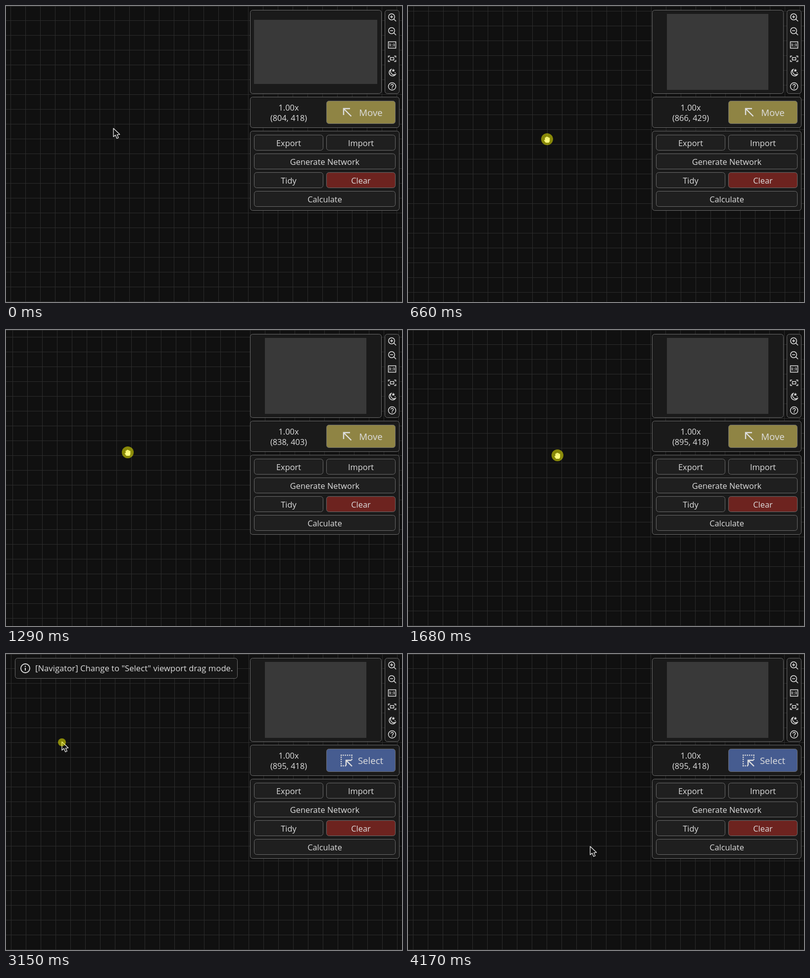
An HTML page with a canvas that plays this animation: 800 px wide and 600 px high, repeating every 4.29 s.

```html
<!DOCTYPE html>
<html lang="en">
<head>
<meta charset="utf-8">
<title>Viewport drag modes</title>
<style>
  html, body { margin: 0; width: 100%; height: 100%; overflow: hidden; background: #101010; }
  canvas { display: block; }
</style>
</head>
<body>
<canvas id="stage" width="800" height="600"></canvas>
<script>
const g = document.getElementById('stage').getContext('2d');
const LOOP = 4290, STEP = 30;
const PAN_START = 120, PAN_END = 1800, CLICK = 2280, MODE_CHANGE = 2310;
const SELECT_START = 3150, SELECT_END = 4110;
const TEXT = '#dedede', BORDER = '#6b6b6b', HOVER = '#747474';

// Centre of the circling drag: [time, x, y]
const orbit = [
  [120, 211, 254], [630, 300, 239.7], [660, 300.8, 238.8], [1260, 280.8, 248.2],
  [1290, 283, 248], [1620, 265.6, 239.4], [1650, 265.3, 249.4]
];

// Free pointer path: [time, x, y]
const route = [
  [60, 217, 248], [120, 211, 254],
  [1800, 302, 254], [2010, 520, 318], [2130, 650, 350], [2190, 700, 352],
  [2280, 716, 215], [2400, 714, 203], [2550, 714, 203],
  [2640, 700, 300], [2700, 660, 350], [2790, 520, 330], [2940, 240, 220],
  [3060, 113, 178], [3150, 113, 178], [3240, 165, 225], [3420, 330, 360],
  [3510, 366, 390], [4110, 366, 390], [4170, 368, 390]
];

const buttons = [
  ['Export', 501, 261, 140], ['Import', 647, 261, 140],
  ['Generate Network', 501, 299, 286],
  ['Tidy', 501, 337, 140], ['Clear', 647, 337, 140, '#6d231f'],
  ['Calculate', 501, 375, 286]
];

const clamp = v => Math.max(0, Math.min(1, v));

function along(keys, t) {
  const next = keys.findIndex(k => k[0] > t);
  if (next < 0) return keys.at(-1).slice(1);
  if (next === 0) return keys[0].slice(1);
  const [t0, x0, y0] = keys[next - 1], [t1, x1, y1] = keys[next];
  const u = (t - t0) / (t1 - t0);
  return [x0 + (x1 - x0) * u, y0 + (y1 - y0) * u];
}

function dragPoint(t) {
  t = Math.max(PAN_START, Math.min(1650, t));
  const [x, y] = along(orbit, t);
  const r = 37 * clamp((t - PAN_START) / 420);
  const a = 2 * Math.PI * (t - 1290) / 750;
  return [Math.round(x - r * Math.cos(a)), Math.round(y + r * Math.sin(a))];
}

function box(x, y, w, h, fill, stroke = BORDER, r = 5) {
  g.beginPath();
  g.roundRect(x + .5, y + .5, w - 1, h - 1, r);
  g.fillStyle = fill;
  g.fill();
  g.strokeStyle = stroke;
  g.lineWidth = 1;
  g.stroke();
}

function label(s, x, y, size = 16.4, align = 'center', weight = 400) {
  g.font = `${weight} ${size}px "Open Sans", "Noto Sans", sans-serif`;
  g.textAlign = align;
  g.fillStyle = TEXT;
  g.fillText(s, x, y);
}

function line(d, width = 1.5, color = TEXT) {
  g.strokeStyle = color;
  g.lineWidth = width;
  g.stroke(new Path2D(d));
}

function disc(x, y, r, fill) {
  g.beginPath();
  g.arc(x, y, r, 0, 7);
  g.fillStyle = fill;
  g.fill();
}

function ring(x, y, r, width = 1.5) {
  g.beginPath();
  g.arc(x, y, r, 0, 7);
  g.strokeStyle = TEXT;
  g.lineWidth = width;
  g.stroke();
}

function grid(ox, oy) {
  g.fillStyle = '#101010';
  g.fillRect(0, 0, 800, 600);
  g.fillStyle = '#2c2c2c';
  for (let x = (ox + 15) % 30; x < 800; x += 30) g.fillRect(x, 0, 1, 600);
  for (let y = (oy + 1) % 30; y < 600; y += 30) g.fillRect(0, y, 800, 1);
  g.fillStyle = '#333';
  g.fillRect(0, 0, 800, 1);
}

function toolIcons() {
  for (const y of [22, 50]) {
    ring(779, y, 6.2);
    line(`M783.5 ${y + 4.5}l4.5 4.5M776 ${y}h6`);
  }
  line('M779 19v6');
  line('M772.5 72.5h15v13h-15z');
  line('M776 76.5v5.5M784 76.5v5.5M775 77l1.2-.6M783 77l1.2-.6');
  g.fillStyle = TEXT;
  g.fillRect(779.2, 77, 1.5, 1.5);
  g.fillRect(779.2, 80.5, 1.5, 1.5);
  line('M772.5 104.5v-3h3.5M784 101.5h3.5v3M787.5 109.5v3h-3.5M776 112.5h-3.5v-3M776.5 104.5h7v5h-7z');
  line('M778 128.5a7 7 0 1 0 9 10a7 7 0 0 1-9-10z');
  g.fill(new Path2D('M782.5 127l1 2.4 2.4.2-1.8 1.6.5 2.4-2.1-1.3-2.1 1.3.5-2.4-1.8-1.6 2.4-.2z'));
  disc(786.2, 135.2, 1, TEXT);
  ring(780, 163, 7.5);
  line('M777.5 161.2a2.5 2.5 0 1 1 3.8 2.1q-1.3.8-1.3 2');
  disc(780, 167, .9, TEXT);
}

function modeButton(select, hovered) {
  box(647, 192, 140, 47, hovered ? HOVER : select ? '#465c90' : '#8f8444');
  if (!select) {
    line('M682 221v-13h13M682.5 208.5l15 15', 2.4);
    label('Move', 737, 223, 18.6);
    return;
  }
  g.fillStyle = TEXT;
  for (let i = 0; i < 6; i++) {
    const d = i * 4.3;
    g.fillRect(676 + d, 204, 2.3, 2.3);
    g.fillRect(676, 204 + d, 2.3, 2.3);
    if (i < 3) {
      g.fillRect(697.5, 204 + d, 2.3, 2.3);
      g.fillRect(676 + d, 225.5, 2.3, 2.3);
    }
  }
  line('M687 226v-10.5h11M687.5 216l11.5 11.5', 2.4);
  label('Select', 736.5, 223, 18.6);
}

function panels(t, ox, oy, hover) {
  box(493, 8, 266, 170, '#1a1a1a');
  g.fillStyle = '#393939';
  if (t <= PAN_START) g.fillRect(501, 28, 249, 130);
  else g.fillRect(523, 16, 205, 154);
  box(765, 8, 30, 170, '#1a1a1a');
  toolIcons();
  box(493, 184, 302, 63, '#1a1a1a');
  label('1.00x', 571, 212);
  label(`(${ox}, ${oy})`, 571, 233);
  modeButton(t >= MODE_CHANGE, hover(647, 192, 140, 47));
  box(493, 253, 302, 162, '#1a1a1a');
  for (const [name, x, y, w, fill = '#1f1f1f'] of buttons) {
    box(x, y, w, 32, hover(x, y, w, 32) ? HOVER : fill);
    label(name, x + w / 2, y + 23);
  }
}

function message(t) {
  g.globalAlpha = clamp((t - MODE_CHANGE) / 90) * clamp((4170 - t) / 90);
  box(18, 8, 450, 42, '#161616');
  ring(39, 29, 9, 1.8);
  line('M39 28v5.5', 2);
  disc(39, 25, 1.2, TEXT);
  label('[Navigator] Change to "Select" viewport drag mode.', 59, 35, 16.7, 'left');
  g.globalAlpha = 1;
}

const shapes = {
  arrow: new Path2D('M0 0V17L4 13.6 7 20.5 10.3 19 7.4 12.8 12.8 12.3Z'),
  point: new Path2D('M-1.8 1Q-1.8-1 0-1T1.8 1V6.5L7 8Q9 8.6 8.7 11L7.6 18.5H-1.5L-6 11.5Q-6 9-3.8 9.6L-1.8 11.5Z'),
  grab: new Path2D('M-4.3 2V-2.6a1.2 1.2 0 0 1 2.4 0V-4a1.2 1.2 0 0 1 2.4 0V-3.4a1.2 1.2 0 0 1 2.4 0V-2a1.2 1.2 0 0 1 2.4 0V3Q5.3 5 3.5 7H-2.8L-6 2.8Q-6.4.8-4.3 2Z')
};

function pointer(kind, x, y) {
  g.save();
  g.translate(x, y);
  g.lineJoin = 'round';
  g.fillStyle = kind === 'grab' ? '#fff' : '#111';
  g.fill(shapes[kind]);
  if (kind !== 'grab') {
    g.strokeStyle = '#e8e8e8';
    g.lineWidth = 1.3;
    g.stroke(shapes[kind]);
  } else {
    line('M-1.9-2.5V0M.5-2.5V0M2.9-2V0', .5, '#777');
  }
  g.restore();
}

function draw(t) {
  const panning = t >= PAN_START && t < PAN_END;
  const selecting = t >= SELECT_START && t < SELECT_END;
  const [x, y] = panning ? dragPoint(t) : along(route, t);
  const [px, py] = dragPoint(t - STEP);   // the view trails the pointer by one step
  const ox = px + 593, oy = py + 164;

  let overButton = false;
  const hover = (bx, by, w, h) => {
    const hit = !panning && x >= bx && x < bx + w && y >= by && y < by + h;
    overButton ||= hit;
    return hit;
  };

  grid(ox, oy);
  if (selecting) {
    const w = x - 113, h = y - 178;
    if (w > 0) box(113, 178, w + 1, h + 1, 'rgba(100,140,225,.6)', '#1c1c9c', 0);
  }
  panels(t, ox, oy, hover);
  if (t > MODE_CHANGE && t < 4170) message(t);

  pointer(panning ? 'grab' : overButton ? 'point' : 'arrow', x, y);
  const pressed = panning ? PAN_START
    : selecting ? SELECT_START
    : t >= CLICK && t < CLICK + 90 ? CLICK : -1;
  if (pressed >= 0) {
    disc(x, y + (selecting ? 1 : 0), Math.min(12, 8 + (t - pressed) / 20), 'rgba(255,255,0,.5)');
  }
}

const start = performance.now();
function tick() {
  const t = (performance.now() - start) % LOOP;
  draw(Math.floor(t / STEP) * STEP);
  requestAnimationFrame(tick);
}
tick();
</script>
</body>
</html>
```
